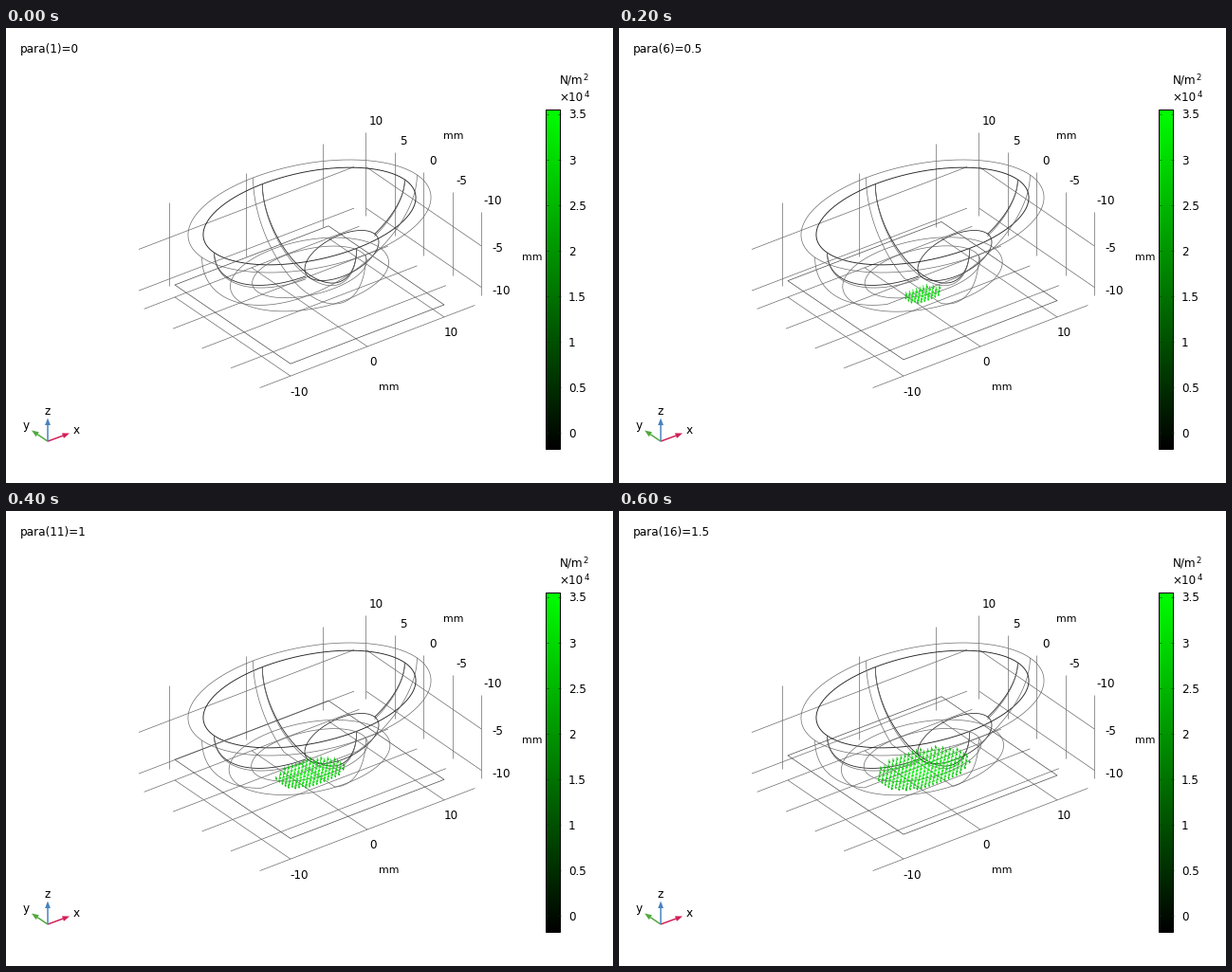
These frames come from a looping animation (640x480 px, 0.8 s). A matplotlib script:

```python
import numpy as np
import matplotlib.pyplot as plt
from matplotlib.animation import FuncAnimation
from matplotlib.collections import LineCollection

W, H, DPI = 640, 480, 100
PT = 72 / DPI
plt.rcParams["font.family"] = "DejaVu Sans"

# Screen vectors of one millimetre along each axis, from the rim centre.
ORIGIN = np.array([320, 198.5])
EX, EY, EZ = np.array([8.1, -3.11]), np.array([-6.1, -4.16]), np.array([0, -8.72])
OUTER = (14.0, 9.75, 9.54)
INNER = (12.4, 8.15, 7.1)
LINING = (12.4, 8.15, 7.45)
FLOOR_Z = -11.0
GRAY, DARK = "#6c6c6c", "#222222"

fig = plt.figure(figsize=(W / DPI, H / DPI), dpi=DPI, facecolor="white")
ax = fig.add_axes([0, 0, 1, 1])
ax.set_xlim(0, W)
ax.set_ylim(H, 0)
ax.axis("off")


def project(x, y, z):
    x, y, z = np.broadcast_arrays(x, y, z)
    return ORIGIN + np.stack([x, y, z], -1) @ np.array([EX, EY, EZ])


def line(points, color=GRAY, width=0.7):
    points = np.asarray(points, float)
    return ax.plot(points[:, 0], points[:, 1], color=color, lw=width * PT,
                   solid_capstyle="butt")[0]


def label(x, middle, text, size=12):
    return ax.text(x, middle + 4.9, text, size=size * PT, va="baseline", ha="left")


def ring(a, b, z):
    t = np.linspace(0, 2 * np.pi, 181)
    return project(a * np.cos(t), b * np.sin(t), z)


def meridian(shape, along_x, floor=-99, start=0, stop=np.pi):
    a, b, c = shape
    t = np.linspace(start, stop, 181)
    z = np.maximum(-c * np.sin(t), floor)
    if along_x:
        return project(a * np.cos(t), 0, z)
    return project(0, b * np.cos(t), z)


def draw_grid():
    for y in range(-10, 11, 5):
        line(project([-14, 14], y, FLOOR_Z))
    for x in (-10, 0, 10):
        line(project(x, [-10, 10], FLOOR_Z))
    for i in range(5):
        x, y = 379.4 + 30.4 * i, 110 + 21 * i
        line([(x, y), (x, y + 88)])
    for i in range(3):
        x, y = 172 + 81 * i, 184 - 31.1 * i
        line([(x, y), (x, y + 88)])
    for dy in (0, 43.6):
        line([(140, 233.5 + dy), (367, 146.5 + dy)])
        line([(380, 146.7 + dy), (501.3, 230 + dy)])


def draw_labels():
    for i, text in enumerate(("10", "5", "0", "-5", "-10")):
        label((383, 415, 446, 474.5, 503.5)[i], 97 + 21 * i, text)
    label(512.5, 231.5, "-5")
    label(512.5, 276, "-10")
    label(299, 383, "-10")
    label(383, 351, "0")
    label(462, 320, "10")
    for x, y in ((461, 112), (544, 240), (393, 377)):
        label(x, y, "mm", 11)


def draw_colorbar():
    left, right, top, bottom = 569.5, 584.5, 86.5, 444.5
    shades = np.zeros((256, 1, 3))
    shades[:, 0, 1] = np.linspace(1, 0, 256)
    ax.imshow(shades, extent=(left, right, bottom, top), aspect="auto",
              interpolation="bilinear")
    ax.add_patch(plt.Rectangle((left, top), right - left, bottom - top,
                               fill=False, ec="black", lw=PT, snap=False))
    for i in range(8):
        y = 90.5 + 48.14 * i
        for x in (left, right - 2.5):
            line([(x, y), (x + 2.5, y)], "#003000", 0.6)
        label(593, y, f"{3.5 - 0.5 * i:g}")
    label(583.5, 54, "N/m")
    label(608.5, 50.5, "2", 8.5)
    label(583.5, 72, "×10")
    label(609.5, 68, "4", 8.5)


def draw_triad():
    start = np.array([44, 436])
    arms = (("x", (67, 427.5), "#d21e55", (70.5, 423)),
            ("y", (27, 424.5), "#50a83c", (17.5, 418.5)),
            ("z", (44, 411.5), "#4682be", (40.5, 403.5)))
    for name, tip, color, (tx, ty) in arms:
        tip = np.array(tip)
        along = (tip - start) / np.hypot(*(tip - start))
        across = np.array([-along[1], along[0]])
        base = tip - 7.5 * along
        line([start, base], color, 1.5)
        ax.add_patch(plt.Polygon([tip, base + 2.9 * across, base - 2.9 * across],
                                 fc=color, ec="none"))
        label(tx, ty, name)


def draw_bowl():
    line(ring(*OUTER[:2], 0))
    line(ring(*INNER[:2], 0), DARK, 0.9)
    for shape, color, width in ((INNER, DARK, 0.8), (LINING, GRAY, 0.7)):
        line(meridian(shape, False), color, width)
        line(meridian(shape, True, stop=0.82), color, width)
        line(meridian(shape, True, start=1.61), color, width)
    t = np.linspace(0, 2 * np.pi, 121)
    line(np.c_[354 + 39 * np.cos(t), 240 + 26.5 * np.sin(t - 0.56)], DARK, 0.75)


def contact_arrows(step, plate_z):
    """Short pressure arrows over the elliptical contact patch."""
    scale = (0, 0.165, 0.285, 0.395)[step]
    if not scale:
        return [], []
    a, b = OUTER[0] * scale, 0.92 * OUTER[1] * scale
    pitch = 0.42 + 0.03 * step
    x, y = np.meshgrid(np.arange(-a, a + 0.01, pitch),
                       np.arange(-b, b + 0.01, 1.1 * pitch))
    radius = np.hypot(x / a, y / b).ravel()
    keep = radius <= 1
    tails = project(x.ravel()[keep], y.ravel()[keep], plate_z) + [0, 1]
    segments, colors = [], []
    for (px, py), r in zip(tails, radius[keep]):
        strength = np.sqrt(1 - r * r)
        length = 3 + 2.5 * strength
        tip = (px + 0.6, py + length)
        segments += [[(px, py), tip],
                     [(px - 0.5, py + length - 1.8), tip, (px + 1.3, py + length - 2)]]
        colors += [(0, 0.65 + 0.3 * strength, 0)] * 2
    return segments, colors


draw_grid()
draw_colorbar()
draw_labels()
draw_triad()
draw_bowl()
title = label(15, 21.5, "")
plate = line([(0, 0)], "#4c4c4c")
outer_ring, inner_ring, long_arc, short_arc = (line([(0, 0)]) for _ in range(4))
arrows = LineCollection([], linewidths=0.75 * PT, zorder=3)
ax.add_collection(arrows)


def update(step):
    title.set_text(f"para({1 + 5 * step})={0.5 * step:g}")
    plate_z = -9.52 + 0.5 * step
    swell = 1 + 0.008 * step
    shapes = (
        (plate, project([-10, 10, 10, -10, -10], [-10, -10, 10, 10, -10], plate_z)),
        (outer_ring, ring(9.12 * swell, 6.4 * swell, -7.05)),
        (inner_ring, ring(6.75 * swell, 4.2 * swell, -6.75)),
        (long_arc, meridian(OUTER, True, plate_z)),
        (short_arc, meridian(OUTER, False, plate_z)),
    )
    for artist, points in shapes:
        artist.set_data(points[:, 0], points[:, 1])
    segments, colors = contact_arrows(step, plate_z)
    arrows.set_segments(segments)
    arrows.set_color(colors)
    return [title, arrows] + [artist for artist, _ in shapes]


animation = FuncAnimation(fig, update, frames=4, interval=200, repeat=True,
                          repeat_delay=0, blit=False)
plt.show()
```
